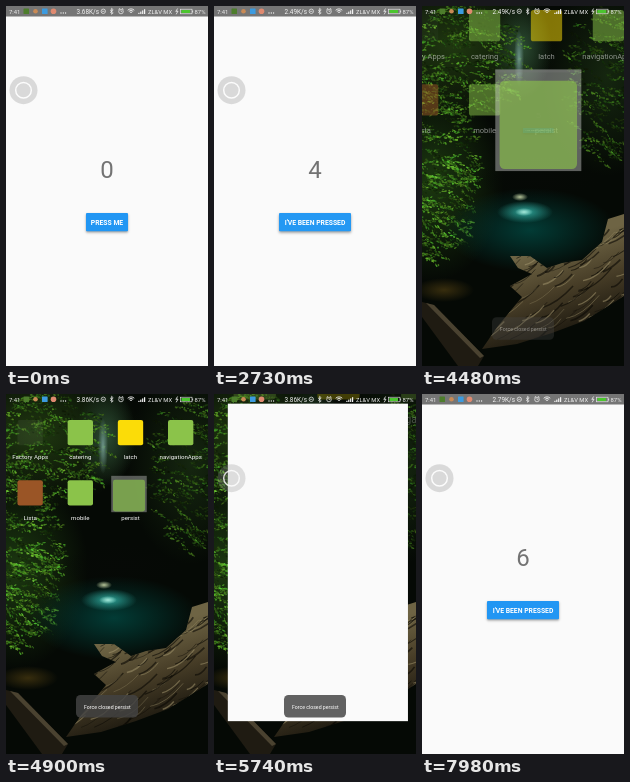
Write an HTML page with a canvas that moves like this. It is 202 px wide and 360 px high and loops after 8000 ms.

```html
<!DOCTYPE html>
<html lang="en">
<head>
<meta charset="utf-8">
<title>Persisted counter</title>
<style>
html, body { margin: 0; width: 100%; height: 100%; overflow: hidden; background: #fafafa; }
canvas { display: block; width: 202px; height: 360px; }
</style>
</head>
<body>
<canvas id="stage"></canvas>
<script>
const W = 202, H = 360, LOOP = 8000;
const dpr = Math.max(1, window.devicePixelRatio || 1);
const stage = document.getElementById('stage');
const FONT = 'Roboto, "Noto Sans", sans-serif';
const GREEN = '#8bc34a';

const PRESSES = [420, 1030, 1640, 2380, 3080, 7000];
const SPEEDS = [[0, '3.68K/s'], [2450, '2.49K/s'], [4550, '3.86K/s'], [6650, '2.79K/s']];
const APPS = [
  [0, 0, 'Factory Apps', 'rgba(190,200,180,.08)'], [1, 0, 'catering', GREEN],
  [2, 0, 'latch', '#fbdc08'], [3, 0, 'navigationApps', GREEN],
  [0, 1, 'Lista', '#9a5526'], [1, 1, 'mobile', GREEN], [2, 1, 'persist', GREEN]
];

const clamp = v => Math.min(1, Math.max(0, v));
const mix = (a, b, k) => a + (b - a) * k;

function sized(c) {
  c.width = W * dpr;
  c.height = H * dpr;
  const g = c.getContext('2d');
  g.scale(dpr, dpr);
  return g;
}

const ctx = sized(stage);
const wallpaper = paintWallpaper();

function box(g, x, y, w, h, r, fill) {
  g.beginPath();
  g.roundRect(x, y, w, h, r);
  g.fillStyle = fill;
  g.fill();
}

function disc(g, x, y, r, fill) {
  g.beginPath();
  g.arc(x, y, r, 0, 7);
  g.fillStyle = fill;
  g.fill();
}

function text(s, x, y, size, fill, align = 'center', weight = 400) {
  ctx.font = `${weight} ${size}px ${FONT}`;
  ctx.textAlign = align;
  ctx.textBaseline = 'alphabetic';
  ctx.fillStyle = fill;
  ctx.fillText(s, x, y);
}

function line(points, color, width) {
  ctx.beginPath();
  points.forEach(([x, y]) => ctx.lineTo(x, y));
  ctx.strokeStyle = color;
  ctx.lineWidth = width;
  ctx.stroke();
}

function paintWallpaper() {
  const c = document.createElement('canvas');
  const g = sized(c);
  let seed = 11;
  const rnd = () => (seed = (seed * 16807) % 2147483647) / 2147483647;

  const glow = (x, y, rx, ry, color) => {
    g.save();
    g.translate(x, y);
    g.scale(rx, ry);
    const f = g.createRadialGradient(0, 0, 0, 0, 0, 1);
    f.addColorStop(0, `rgba(${color},.95)`);
    f.addColorStop(1, `rgba(${color},0)`);
    disc(g, 0, 0, 1, f);
    g.restore();
  };
  // sprays of small leaves along short slanting twigs
  const leaves = (n, x, y, rx, ry, light) => {
    for (let i = 0; i < n; i++) {
      const a = rnd() * 6.28, d = Math.sqrt(rnd());
      const cx = x + Math.cos(a) * d * rx, cy = y + Math.sin(a) * d * ry;
      const slope = rnd() * 1.2 - .3, tone = light * (.25 + rnd());
      for (let j = 0; j < 9; j++) {
        const s = j * 1.5;
        g.beginPath();
        g.ellipse(cx + s + rnd() * 2, cy + s * slope + rnd() * 4 - 2,
          .7 + rnd() * 1.2, .4 + rnd() * .6, slope + rnd() - .5, 0, 7);
        g.fillStyle = `hsla(${88 + rnd() * 20},62%,${tone * (.6 + rnd() * .7)}%,.85)`;
        g.fill();
      }
    }
  };
  const shape = (pts, fill) => {
    g.beginPath();
    pts.forEach(([x, y]) => g.lineTo(x, y));
    g.closePath();
    g.fillStyle = fill;
    g.fill();
  };

  g.fillStyle = '#050905';
  g.fillRect(0, 0, W, H);
  glow(30, 40, 105, 75, '33,58,17');
  glow(10, 175, 72, 100, '29,58,17');
  glow(185, 70, 65, 100, '22,40,16');
  glow(100, 42, 30, 50, '44,76,52');
  leaves(160, 38, 52, 62, 55, 31);
  leaves(240, 5, 168, 44, 85, 36);
  leaves(130, 175, 75, 38, 80, 23);
  glow(116, 172, 62, 22, '6,9,6');
  glow(108, 224, 86, 42, '2,62,56');
  glow(103, 206, 28, 11, '48,172,160');
  glow(102, 206, 9, 4, '170,235,220');
  glow(98, 191, 8, 4, '190,205,160');
  glow(97, 52, 5, 28, '110,150,140');
  glow(22, 284, 30, 12, '58,47,14');

  const bark = g.createLinearGradient(120, 245, 150, 335);
  bark.addColorStop(0, '#6e6444');
  bark.addColorStop(.45, '#473d27');
  bark.addColorStop(1, '#15120b');
  const log = [[202, 208], [186, 213], [180, 236], [160, 254], [140, 257], [125, 262], [108, 250],
    [88, 250], [96, 262], [110, 268], [88, 280], [100, 291], [76, 320], [60, 343], [95, 338],
    [130, 327], [162, 315], [202, 290]];
  shape(log, bark);
  g.save();
  g.clip();
  // wood grain
  for (let i = 0; i < 130; i++) {
    const x = 60 + rnd() * 142, y = 210 + rnd() * 130, len = 8 + rnd() * 26;
    g.beginPath();
    g.moveTo(x, y);
    g.quadraticCurveTo(x + len * .5, y - len * .2 + rnd() * 4, x + len, y - len * .7);
    g.lineWidth = .5 + rnd() * 1.4;
    g.strokeStyle = rnd() < .38 ? 'rgba(160,148,108,.55)' : 'rgba(10,9,4,.6)';
    g.stroke();
  }
  g.restore();
  shape([[0, 296], [12, 299], [62, 350], [56, 360], [36, 360], [0, 311]], '#1f1b12');
  shape([[4, 297], [12, 299], [62, 350], [58, 352]], '#4a4230');
  return c;
}

function button(t, count) {
  const since = Math.min(...PRESSES.map(p => t >= p - 70 ? t - p + 70 : 1e9));
  const lift = since < 450 ? Math.sin(since / 450 * Math.PI) : 0;
  const w = count ? 72 : 42, x = 101 - w / 2;
  ctx.save();
  ctx.shadowColor = 'rgba(0,0,0,.38)';
  ctx.shadowBlur = (2.5 + lift * 2) * dpr;
  ctx.shadowOffsetY = (1.2 + lift) * dpr;
  box(ctx, x, 207, w, 18.3, 1, '#2196f3');
  ctx.restore();
  if (since < 450) {
    ctx.save();
    ctx.beginPath();
    ctx.roundRect(x, 207, w, 18.3, 1);
    ctx.clip();
    disc(ctx, 101, 216, 6 + since / 6, `rgba(255,255,255,${.22 * (1 - since / 450)})`);
    ctx.restore();
  }
  text(count ? "I'VE BEEN PRESSED" : 'PRESS ME', 101, 218.6, 6.8, '#fff', 'center', 700);
}

function app(t, bar) {
  ctx.fillStyle = '#fafafa';
  ctx.fillRect(0, 0, W, H);
  if (bar) {
    ctx.fillStyle = '#757575';
    ctx.fillRect(0, 0, W, 10.5);
  }
  if (t > 4800 && t < 6300) return;
  const count = PRESSES.filter(p => t >= p).length;
  text(count, 101, 172, 24, '#737373');
  button(t, count);
}

// 0 = window fills the screen, 1 = window sits on its icon
function shrink(t) {
  if (t < 3960 || t >= 5868) return 0;
  if (t < 4792) return (t - 3900) / 892;
  return t < 4834 ? 1 : (5868 - t) / 1034;
}

function home(t, p) {
  const zoom = 1 + .87 * (1 - p);
  ctx.save();
  ctx.globalAlpha = t < 4800 ? p * p * .6 + p * .4 : clamp(p * 2);
  ctx.translate(124.5, 120);
  ctx.scale(zoom, zoom);
  ctx.translate(-124.5, -120);
  for (const [col, row, name, color] of APPS) {
    const x = 29.5 + col * 47.5, y = 43 + row * 57;
    if (name !== 'persist' || p === 1) box(ctx, x - 12, y - 12, 24, 24, 2, color);
    text(name, x, y + 25.4, 5.8, '#fff');
  }
  ctx.restore();
}

function appWindow(t, p) {
  const closing = t < 4800;
  const qy = clamp(closing ? .027 + 1.22 * p : 1.18 * p);
  const qh = clamp(closing ? .02 + 1.15 * p : 1.03 * p);
  const w = mix(202, 24, p), h = mix(360, 24, qh);
  const x = mix(101, 124.5, p) - w / 2, y = mix(180, 100, qy) - h / 2;
  ctx.save();
  ctx.translate(x, y);
  ctx.scale(w / W, h / H);
  ctx.globalAlpha = closing ? clamp(1 - (p - .3) / .55) : clamp((1 - p) / .2);
  app(t, closing);
  ctx.restore();
  ctx.save();
  ctx.globalAlpha = closing ? clamp((p - .3) / .55) : clamp((p - .8) / .2);
  box(ctx, x + w * .05, y + h * .11, w * .9, h * .87, w * .06, GREEN);
  ctx.restore();
}

function ball(alpha) {
  if (!alpha) return;
  ctx.save();
  ctx.globalAlpha = alpha;
  disc(ctx, 17.5, 84.2, 14, 'rgba(150,150,150,.32)');
  ctx.beginPath();
  ctx.arc(17.5, 84.2, 7.8, 0, 7);
  ctx.strokeStyle = 'rgba(255,255,255,.9)';
  ctx.lineWidth = 1.5;
  ctx.stroke();
  ctx.restore();
}

function toast(t) {
  const show = clamp((t - 4300) / 420);
  const alpha = Math.min(show, clamp((6090 - t) / 210));
  if (!alpha) return;
  ctx.save();
  ctx.globalAlpha = alpha;
  ctx.translate(0, 18 * (1 - show));
  box(ctx, 70, 301, 62, 22.5, 4.5, 'rgba(67,67,67,.83)');
  text('Force closed persist', 101.3, 314.8, 5.2, '#fff');
  ctx.restore();
}

function status(t) {
  const ink = '#f2f2f2';
  text('7:41', 3, 7.6, 5.9, ink, 'left');
  box(ctx, 17.5, 2.5, 5.5, 5.5, .5, '#4d7d2c');
  disc(ctx, 29.5, 5.3, 2.3, '#c98a55');
  box(ctx, 36, 2.5, 5.6, 5.6, .5, '#3c9be0');
  disc(ctx, 47.5, 5.3, 2.8, '#e08a70');
  for (let i = 0; i < 3; i++) disc(ctx, 55 + i * 2.3, 7, .65, ink);

  const speed = SPEEDS.filter(s => t >= s[0]).pop()[1];
  text(speed, 93, 7.7, 6.4, ink, 'right');

  ctx.strokeStyle = ink;
  ctx.lineWidth = .7;
  ctx.beginPath();
  ctx.arc(97.3, 5.3, 2.2, 0, 7);
  ctx.moveTo(96.1, 5.3);
  ctx.lineTo(98.5, 5.3);
  ctx.stroke();
  line([[104, 3.8], [107.2, 6.8], [105.6, 8.3], [105.6, 2.3], [107.2, 3.8], [104, 6.8]], ink, .7);
  ctx.beginPath();
  ctx.arc(115, 5.5, 2.3, 0, 7);
  ctx.stroke();
  line([[115, 4], [115, 5.6], [116.3, 5.6]], ink, .6);
  line([[112.5, 3.4], [114, 2.3]], ink, .7);
  line([[117.5, 3.4], [116, 2.3]], ink, .7);
  for (const r of [1.5, 3.1, 4.7]) {
    ctx.beginPath();
    ctx.arc(125, 7.6, r, -2.35, -.8);
    ctx.lineWidth = .9;
    ctx.stroke();
  }
  for (let i = 0; i < 4; i++) {
    ctx.fillStyle = ink;
    ctx.fillRect(132.3 + i * 1.9, 6.8 - i * 1.2, 1.2, 1.2 + i * 1.2);
  }
  text('ZL&V MX', 142, 7.6, 5.8, ink, 'left');
  line([[171.6, 2.5], [169.8, 5.4], [172, 5.1], [170.2, 8.3]], ink, .8);
  ctx.strokeStyle = ink;
  ctx.lineWidth = .6;
  ctx.strokeRect(174.6, 3.2, 11.4, 4.6);
  box(ctx, 175.4, 4, 8.6, 3, 0, '#4cc52f');
  box(ctx, 186.3, 4.5, .8, 2, 0, ink);
  text('87%', 199.5, 7.6, 5.9, ink, 'right');
}

function draw(t) {
  const p = shrink(t);
  if (p) {
    ctx.drawImage(wallpaper, 0, 0, W, H);
    home(t, p);
    if (p < 1) appWindow(t, p);
  } else {
    app(t, true);
  }
  ball(clamp(1.2 - p / .4));
  toast(t);
  status(t);
}

const start = performance.now();
function tick() {
  draw((performance.now() - start) % LOOP);
  requestAnimationFrame(tick);
}
tick();
</script>
</body>
</html>
```
